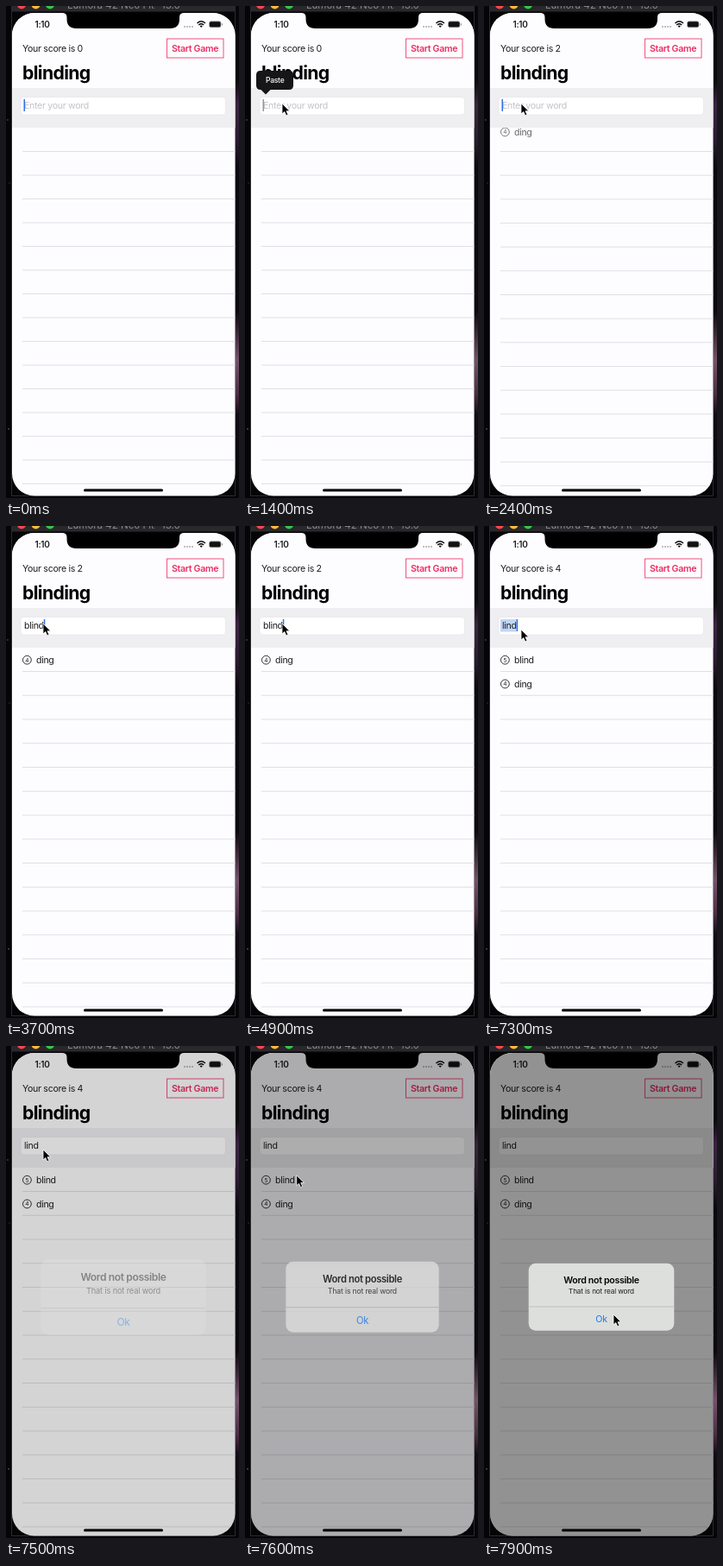
These frames come from a looping animation (270x570 px, 8000 ms). An HTML page:

```html
<!DOCTYPE html>
<html lang="en">
<head>
<meta charset="utf-8">
<title>Word game</title>
<style>
  html, body { margin: 0; width: 100%; height: 100%; overflow: hidden; background: #050407; }
  svg { display: block; width: 270px; height: 570px; }
  text { font: 10.6px Inter, sans-serif; letter-spacing: -.03em; fill: #1c1c1e; white-space: pre; }
  .mid { text-anchor: middle; }
  .bold { font-weight: 600; }
  .bar { font-size: 11.5px; letter-spacing: 0; fill: #8a898c; }
  .line { stroke: #e0dfe4; }
</style>
</head>
<body>
<svg viewBox="0 0 270 570">
  <defs>
    <linearGradient id="sky" x2="0" y2="1">
      <stop offset="0" stop-color="#08060a"/>
      <stop offset=".15" stop-color="#0a080c"/>
      <stop offset=".2" stop-color="#3a2440"/>
      <stop offset=".27" stop-color="#2a1c30"/>
      <stop offset=".33" stop-color="#0c0810"/>
      <stop offset=".62" stop-color="#0c080e"/>
      <stop offset=".72" stop-color="#74526a"/>
      <stop offset=".79" stop-color="#4a2c42"/>
      <stop offset=".83" stop-color="#120c14"/>
      <stop offset="1" stop-color="#060508"/>
    </linearGradient>
    <clipPath id="phone"><rect x="7" y="8" width="258.500" height="559.500" rx="26"/></clipPath>
  </defs>

  <!-- desktop and window bar -->
  <rect width="270" height="570" fill="#050407"/>
  <rect x="266" width="4" height="570" fill="url(#sky)"/>
  <g fill="#77707c">
    <circle cx="2" cy="132" r=".7"/><circle cx="3" cy="490" r=".8"/><circle cx="4" cy="205" r=".5"/>
  </g>
  <path d="M6.500 6V567.500H265.500V6" fill="none" stroke="#2c2b2e"/>
  <rect x="6" width="260" height="6.500" fill="#29282b"/>
  <circle cx="18" cy="-1.500" r="5" fill="#fc4650"/>
  <circle cx="34.500" cy="-1.500" r="5" fill="#fdbc40"/>
  <circle cx="51" cy="-1.500" r="5" fill="#34c84a"/>
  <text class="bar" x="71" y="3">Lumora 42 Neo Fit</text>
  <text class="bar" x="180" y="3">13.6</text>

  <g clip-path="url(#phone)">
    <rect y="8" width="270" height="562" fill="#fdfcfe"/>
    <g id="lines"></g>
    <g id="rows"></g>

    <!-- header -->
    <rect x="7" y="8" width="259" height="87" fill="#fdfcfe"/>
    <text class="mid bold" x="42" y="25.200" style="font-size:10px">1:10</text>
    <g fill="#a5a4a8">
      <circle cx="207" cy="24" r=".9"/><circle cx="210" cy="24" r=".9"/>
      <circle cx="213" cy="24" r=".9"/><circle cx="216" cy="24" r=".9"/>
    </g>
    <g fill="none" stroke="#111" stroke-width="1.500">
      <path d="M221.500 20q4.700-4.400 9.400 0M223.200 22q3-2.800 6 0"/>
    </g>
    <path d="M224.600 23.300q1.600-1.400 3.200 0l-1.600 1.700z" fill="#111"/>
    <rect x="235.500" y="17.800" width="13.500" height="7" rx="2" fill="#111" stroke="#aaa" stroke-width=".7"/>
    <rect x="250" y="20" width="1" height="2.600" rx=".5" fill="#999"/>
    <text id="score" x="19" y="52.700"></text>
    <rect x="186.500" y="38" width="65.500" height="22" fill="none" stroke="#f0527f"/>
    <text class="mid bold" x="219" y="52.700" style="fill:#ea2f62">Start Game</text>
    <text x="19" y="85" style="font-size:21.200px;font-weight:700;fill:#000">blinding</text>

    <!-- input -->
    <rect x="7" y="95" width="259" height="46" fill="#efeef1"/>
    <rect x="17" y="105.500" width="237.500" height="20.500" rx="3.500" fill="#fff" stroke="#e5e4e8" stroke-width=".7"/>
    <rect id="pick" x="19" y="108" height="14.500" fill="#c0d6f7"/>
    <text id="hint" x="21" y="119" style="fill:#c3c2c6">Enter your word</text>
    <text id="word" x="21" y="119"></text>
    <rect id="caret" y="108" width="1.500" height="14"/>

    <g id="menu">
      <path d="M18 75H51q5 0 5 5V92q0 5-5 5H29.500L24 102.500 18.500 97H18q-5 0-5-5V80q0-5 5-5z" fill="#161618"/>
      <text class="mid" x="34.700" y="89" style="font-size:8.500px;font-weight:500;fill:#fff">Paste</text>
    </g>

    <rect x="90" y="559.500" width="92" height="3" rx="1.500"/>
    <rect id="dim" x="7" y="8" width="259" height="560"/>
    <path d="M65 8q5.500 0 5.500 5v2q0 11 11 11H190q11 0 11-11v-2q0-5 5.500-5z"/>

    <g id="alert">
      <rect x="52" y="252" width="168" height="77.500" rx="8" fill="#dfe1df"/>
      <path d="M52 302H220" stroke="#bfc0c1"/>
      <text class="mid bold" x="136" y="274.600" style="fill:#000">Word not possible</text>
      <text class="mid" x="136" y="287.200" style="font-size:8.100px;letter-spacing:-.015em">That is not real word</text>
      <text class="mid" x="136" y="320" style="fill:#1479f2">Ok</text>
    </g>
  </g>
  <path id="mouse" d="M0 0V12L2.800 9.500 4.700 13.800 6.900 12.900 5 8.700H8.800Z" fill="#000" stroke="#fff" stroke-width=".8"/>
</svg>
<script>
const $ = id => document.getElementById(id);
const set = (el, props) => { for (const k in props) el.setAttribute(k, props[k]); };
const make = (parent, tag, props, text = '') => {
  const el = document.createElementNS('http://www.w3.org/2000/svg', tag);
  set(el, props);
  el.textContent = text;
  return parent.appendChild(el);
};
const clamp = v => Math.max(0, Math.min(1, v));
const ramp = (t, a, b) => clamp((t - a) / (b - a));
const mix = (a, b, p) => a + (b - a) * p;
const smooth = p => p * p * (3 - 2 * p);
const last = (keys, t) => keys.filter(k => k[0] <= t).pop()[1];

const LOOP = 8000, STEP = 100, ROW = 27.75, TOP = 168.5;

const typed = [[0, ''],
  [1900, 'd'], [2000, 'di'], [2100, 'din'], [2200, 'ding'], [2300, ''],
  [3100, 'b'], [3200, 'bl'], [3300, 'bli'], [3400, 'blin'], [3700, 'blind'], [5000, ''],
  [6900, 'l'], [7000, 'li'], [7300, 'lind']];
const blink = [[0, 1], [1000, .6], [1100, .3], [1200, 0], [1400, .6], [1700, 1],
  [2800, 0], [3100, 1], [4000, 0], [4200, .5], [4300, 1], [4500, .5], [4600, 0],
  [4800, .5], [4900, 1], [6400, 0], [6600, .5], [6700, 1], [7500, 0]];
const menuFade = [[0, 0], [1400, 1], [1500, .6], [1600, .25], [1700, 0]];

const lines = Array.from({ length: 15 }, () => make($('lines'), 'path', { class: 'line' }));
const rows = ['ding', 'blind'].map(word => {
  const g = make($('rows'), 'g', {});
  make(g, 'circle', { cx: 24.4, cy: 155.2, r: 4.9, fill: 'none', stroke: '#1c1c1e', 'stroke-width': .9 });
  make(g, 'text', { class: 'mid', x: 24.4, y: 157.6, style: 'font-size:6.6px;letter-spacing:0' }, word.length);
  make(g, 'text', { x: 35, y: 159 }, word);
  return g;
});

function mouseAt(t) {
  if (t < 1000) {
    const p = smooth(ramp(t, 0, 900));
    return [mix(150, 43, p), mix(576, 113, p)];
  }
  const p = smooth(ramp(t, 7500, 7900));
  return [mix(43, 150, p), mix(mix(113, 120, ramp(t, 5400, 5600)), 311, p)];
}

function draw(t) {
  const first = ramp(t, 2200, 2500), second = ramp(t, 4900, 5200);
  lines.forEach((el, i) =>
    set(el, { d: `M19 ${TOP + i * mix(27.5, ROW, first)}H266` }));
  set(rows[0], { opacity: first, transform: `translate(0 ${ROW * (first - 1 + second)})` });
  set(rows[1], { opacity: second, transform: `translate(0 ${ROW * (second - 1)})` });
  $('score').textContent = 'Your score is ' + (t < 2300 ? 0 : t < 5000 ? 2 : 4);

  const text = last(typed, t);
  $('word').textContent = text;
  set($('hint'), { opacity: text ? 0 : 1 });
  const end = text ? 21 + $('word').getComputedTextLength() : 20.5;
  const menu = last(menuFade, t);
  set($('caret'), { x: end, opacity: last(blink, t), fill: menu ? '#555' : '#2f74e0' });
  set($('pick'), { width: end - 19, opacity: t >= 7100 && t < 7500 ? 1 : 0 });
  set($('menu'), { opacity: menu });

  const p = t < 7500 ? 0 : 1 - Math.exp((7449 - t) / 110);
  set($('dim'), { opacity: .43 * p });
  set($('alert'), {
    opacity: p,
    transform: `translate(136 290.5) scale(${1 + .22 * (1 - p)}) translate(-136 -290.5)`
  });
  set($('mouse'), { transform: `translate(${mouseAt(t)})` });
}

const start = performance.now();
function frame() {
  const t = (performance.now() - start) % LOOP;
  draw(Math.floor(t / STEP) * STEP);
  requestAnimationFrame(frame);
}
frame();
</script>
</body>
</html>
```
